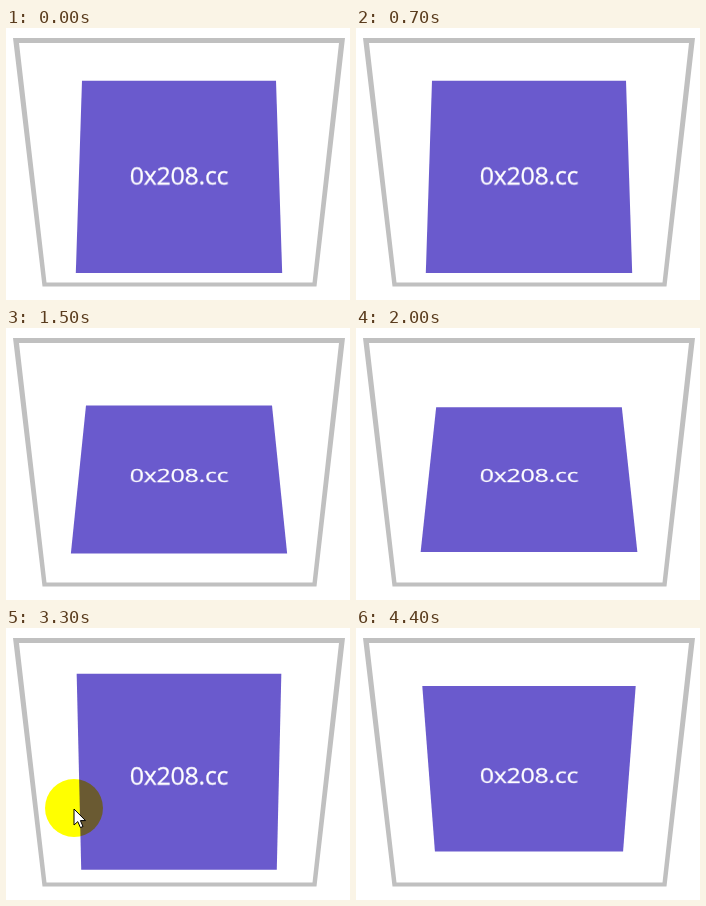
Recreate the animation shown at these times as an HTML page. Size 344 by 272 pixels, loop 4.8 s.

```html
<!DOCTYPE html>
<html lang="en">
<head>
<meta charset="utf-8">
<title>Tilting card</title>
<style>
  html, body { margin: 0; width: 100%; height: 100%; overflow: hidden; background: #fff; }
  #stage {
    position: relative; width: 344px; height: 272px; overflow: hidden; background: #fff;
    perspective: 900px; perspective-origin: 173px 146.2px;
  }
  svg { position: absolute; left: 0; top: 0; }
  #card {
    position: absolute; left: 73px; top: 46.2px; width: 200px; height: 200px;
    background: #6a5acd; color: #fff; text-align: center;
    font: 25px/202px "Open Sans", "Noto Sans", sans-serif;
    letter-spacing: -.3px; -webkit-text-stroke: .3px #fff;
  }
  /* blue by difference: yellow on white, brown on the card */
  #spot {
    position: absolute; left: -29px; top: -29px; width: 58px; height: 58px;
    border-radius: 50%; background: #00f; mix-blend-mode: difference;
  }
  #arrow { left: -1px; }
</style>
</head>
<body>
<div id="stage">
  <svg width="344" height="272">
    <path fill="#c0c0c0" fill-rule="evenodd"
      d="M7 10H339L310.5 258.5H36.5ZM13 15L40.5 254.5H306.5L333 15Z"/>
  </svg>
  <div id="card">0x208.cc</div>
  <div id="spot"></div>
  <svg id="arrow" width="14" height="22" viewBox="-1 -1 14 22">
    <path d="M0 0V16L3.8 12.6L6.4 18.6L9 17.5L6.4 11.6H11.5Z" fill="#fff" stroke="#000"/>
  </svg>
</div>
<script>
const STEP = 100, LOOP = 4800, LAST = 4400;
const MAX_TILT = 45, EDGE = 310;

// the card swings like a pendulum; at each time (s) its phase (degrees) reaches a turn
const turns = [
  [0, -69], [.7, 69], [1.1, 88], [2, -12], [3, -149], [3.6, -290], [4.4, -220]
];

// the pointer comes in from the right, stops at x, y and goes back
const visits = [
  { from: .2, to: .6, x: 290, y: 172 },
  { from: .8, to: 1.4, x: 213, y: 172 },
  { from: 3, to: 4, x: 68, y: 180 }
];

const spot = document.getElementById("spot");
const arrow = document.getElementById("arrow");
const card = document.getElementById("card");

const mix = (a, b, u) => a + (b - a) * u;
const easeOut = u => 1 - (1 - u) ** 2;

function tilt(t) {
  const i = Math.max(1, turns.findIndex(turn => turn[0] >= t));
  const [t0, a] = turns[i - 1], [t1, b] = turns[i];
  const phase = mix(a, b, easeOut((t - t0) / (t1 - t0)));
  return MAX_TILT * Math.cos(phase * Math.PI / 180);
}

function reach(t, { from, to }) {
  return Math.min(1, 1.25 * Math.sin(Math.PI * (t - from) / (to - from)));
}

function draw(now) {
  const t = Math.min(LAST, Math.floor(now % LOOP / STEP) * STEP) / 1000;
  card.style.transform = `rotateX(${tilt(t)}deg)`;

  const visit = visits.find(v => t > v.from && t < v.to);
  for (const part of [spot, arrow]) {
    part.style.display = visit ? "block" : "none";
    if (visit) part.style.translate = `${mix(EDGE, visit.x, reach(t, visit))}px ${visit.y}px`;
  }
}

const start = performance.now();
(function tick() {
  draw(performance.now() - start);
  requestAnimationFrame(tick);
})();
</script>
</body>
</html>
```
